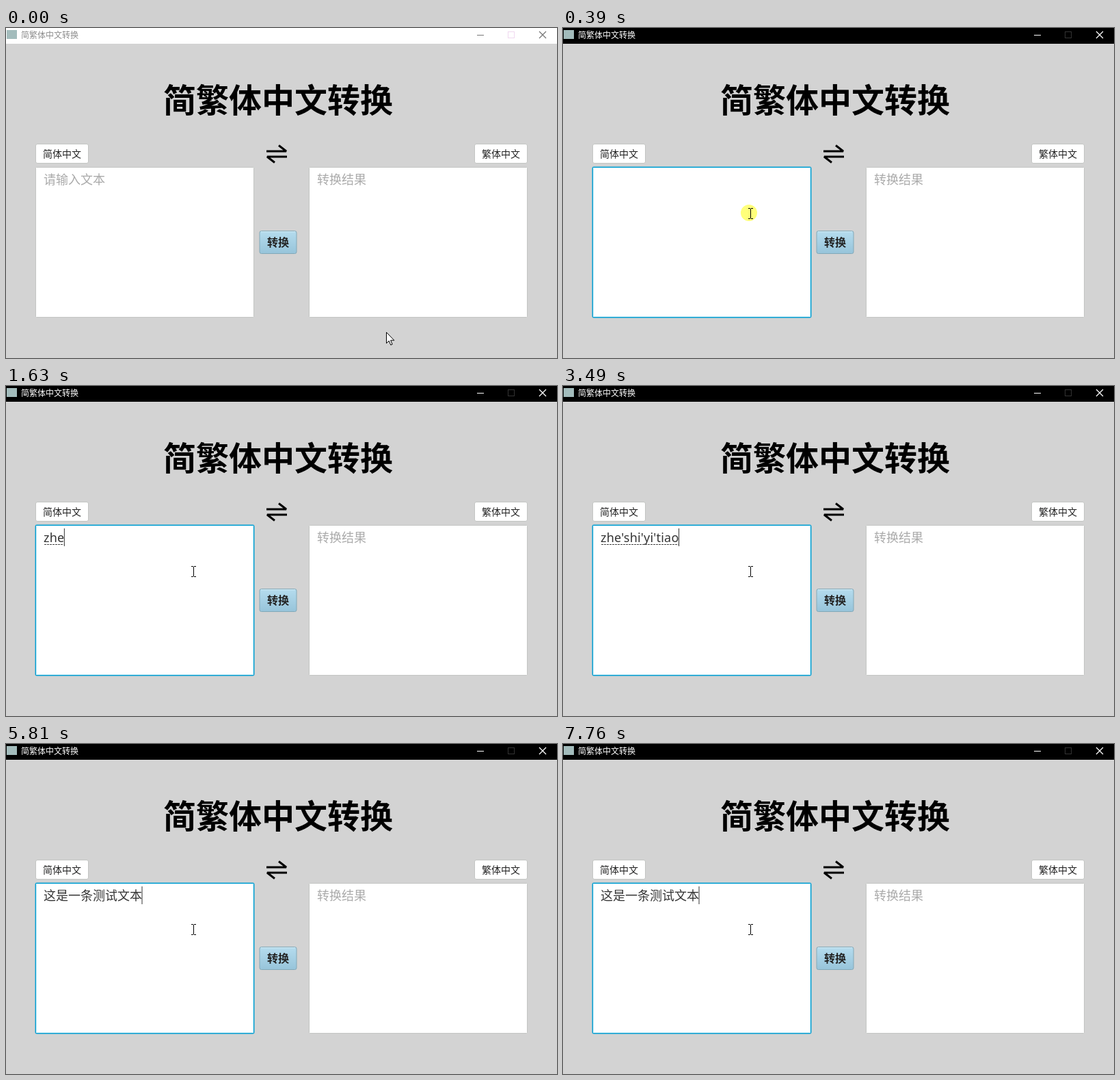
Animation of 806x482 px, one loop 8000 ms. Source, as an HTML page:

```html
<!DOCTYPE html>
<html lang="zh-CN">
<head>
<meta charset="utf-8">
<title>简繁体中文转换</title>
<style>
  html, body { margin: 0; width: 100%; height: 100%; overflow: hidden; background: #d3d3d3; }
  svg { display: block; font-family: 'Noto Sans CJK SC', 'Noto Sans CJK', sans-serif; }
  .middle { text-anchor: middle; }
  .label { font-size: 14px; fill: #222; }
  .body { font-size: 18px; fill: #333; }
  .hint { font-size: 18px; fill: #aaa; }
  #composing { font-family: 'Noto Sans', sans-serif; letter-spacing: .2px; }
  .box { fill: #fff; stroke: #c3c5c3; }
  .line { fill: none; stroke: currentColor; }
  #bar { color: #777; --bar: #fff; --title: #8c8c8c; --disabled: #f0d9f0; }
  .active #bar { color: #fff; --bar: #000; --title: #fff; --disabled: #333; }
  #focus, .active #leftHint { visibility: hidden; }
  .active #focus { visibility: visible; }
</style>
</head>
<body>
<svg id="stage" width="806" height="482" viewBox="0 0 806 482">
  <defs>
    <linearGradient id="blue" x2="0" y2="1">
      <stop stop-color="#b5dcee"/><stop offset="1" stop-color="#97c4da"/>
    </linearGradient>
  </defs>
  <rect width="806" height="482" fill="#d3d3d3"/>

  <g id="bar">
    <rect width="806" height="23" fill="var(--bar)"/>
    <rect x="1" y="3" width="15" height="13" fill="#a3bcbc"/>
    <text x="22" y="14.5" font-size="12" fill="var(--title)">简繁体中文转换</text>
    <path class="line" d="M689 10.5h10"/>
    <path class="line" stroke-width="1.3" d="M780 5l10 10m0-10l-10 10"/>
    <rect x="734.5" y="5.5" width="9" height="9" fill="none" stroke="var(--disabled)"/>
  </g>

  <text class="middle" x="398" y="123" font-size="48" font-weight="700">简繁体中文转换</text>

  <rect class="box" x="43.5" y="169.5" width="77" height="28" rx="2.5"/>
  <text class="label middle" x="82" y="189">简体中文</text>
  <rect class="box" x="685.5" y="169.5" width="77" height="28" rx="2.5"/>
  <text class="label middle" x="724" y="189">繁体中文</text>

  <path class="line" stroke-width="3" stroke-linejoin="bevel" d="M381 180h29l-11-8.5M411 188h-29l11 8.5"/>

  <rect class="box" x="43.5" y="203.5" width="319" height="219" rx="1"/>
  <g id="focus" fill="none">
    <rect x="42.5" y="202.5" width="321" height="221" rx="2.5" stroke="#039ed3" stroke-opacity=".3"/>
    <rect x="43.5" y="203.5" width="319" height="219" rx="1.5" stroke="#039ed3" stroke-width="1.4"/>
    <rect x="44.5" y="204.5" width="317" height="217" stroke="#d6f2f8"/>
  </g>
  <rect class="box" x="443.5" y="203.5" width="319" height="219" rx="1"/>
  <text id="leftHint" class="hint" x="55" y="228">请输入文本</text>
  <text class="hint" x="455" y="228">转换结果</text>

  <rect x="371" y="296.5" width="54" height="33" rx="2.5" fill="url(#blue)" stroke="#82a9b8"/>
  <path d="M373 297.5h50" stroke="#d2ebf5"/>
  <text class="middle" x="398" y="319" font-size="16" font-weight="700" fill="#222">转换</text>

  <text id="committed" class="body" x="55" y="228"></text>
  <text id="composing" class="body" y="228"></text>
  <path id="underline" stroke="#444" stroke-dasharray="3 1"/>
  <path id="caret" d="M0 208v26" stroke="#333"/>

  <g id="pointer">
    <circle id="click" cx="-2" cy="-1" r="12" fill="#ffff7a"/>
    <path id="arrow" d="M.5.5v16l3.7-3.5 2.6 6 2.4-1-2.6-5.8h5.2z" fill="#fff" stroke="#000"/>
    <path id="beam" class="line" d="M-3 -7.5h3m1 0h3M.5 -7v14M-3 7.5h3m1 0h3"/>
  </g>
</svg>
<script>
const LOOP = 8000;
const ACTIVATE = 310, RELEASE = 460;
const TEXT_X = 55;
const START = [556, 444], END = [274, 271];

// time, share of the way travelled
const travel = [[0, 0], [70, .15], [150, .5], [230, .85], [310, 1]];

// time, committed text, composing text, caret shown
const typing = [
  [0, '', '', false], [460, '', '', true], [940, '', '', false],
  [1250, '', 'z', true], [1310, '', 'zh', true], [1630, '', 'zhe', true], [2100, '', 'zhe', false],
  [2330, '', "zhe's", true], [2410, '', "zhe'shi", true],
  [2720, '', "zhe'shi'y", true], [2890, '', "zhe'shi'yi", true],
  [3350, '', "zhe'shi'yi't", true], [3420, '', "zhe'shi'yi'ti", true], [3490, '', "zhe'shi'yi'tiao", true],
  [3970, '这是一条', '', true], [4430, '这是一条', '', false],
  [4720, '这是一条', 'c', true], [4800, '这是一条', 'ce', true],
  [4950, '这是一条', "ce's", true], [5030, '这是一条', "ce'shi", true],
  [5180, '这是一条', "ce'shi'w", true], [5410, '这是一条', "ce'shi'wen", true],
  [5570, '这是一条', "ce'shi'wen'b", true], [5640, '这是一条', "ce'shi'wen'ben", true],
  [5810, '这是一条测试文本', '', true], [6280, '这是一条测试文本', '', false],
  [6830, '这是一条测试文本', '', true]
];

const el = id => document.getElementById(id);
const show = (id, on) => el(id).setAttribute('visibility', on ? 'visible' : 'hidden');
const at = (steps, t) => steps.findLast(step => step[0] <= t);
const textWidth = id => el(id).textContent ? el(id).getComputedTextLength() : 0;

function drawText(t) {
  const [, committed, composing, caretOn] = at(typing, t);
  el('committed').textContent = committed;
  el('composing').textContent = composing;
  const from = TEXT_X + textWidth('committed');
  const to = from + textWidth('composing');
  el('composing').setAttribute('x', from);
  el('underline').setAttribute('d', composing ? `M${from + 1} 231.5H${to - 1}` : '');
  el('caret').setAttribute('transform', `translate(${to} 0)`);
  show('caret', caretOn);
}

function drawPointer(t) {
  const share = at(travel, t)[1];
  const [x, y] = START.map((s, i) => Math.round(s + (END[i] - s) * share));
  const overText = y > 203 && y < 423 && (x > 43 && x < 363 || x > 443 && x < 763);
  el('pointer').setAttribute('transform', `translate(${x} ${y})`);
  show('beam', overText);
  show('arrow', !overText);
  show('click', t >= ACTIVATE && t < RELEASE);
}

function frame() {
  const t = performance.now() % LOOP;
  el('stage').classList.toggle('active', t >= ACTIVATE);
  drawText(t);
  drawPointer(t);
  requestAnimationFrame(frame);
}
frame();
</script>
</body>
</html>
```
